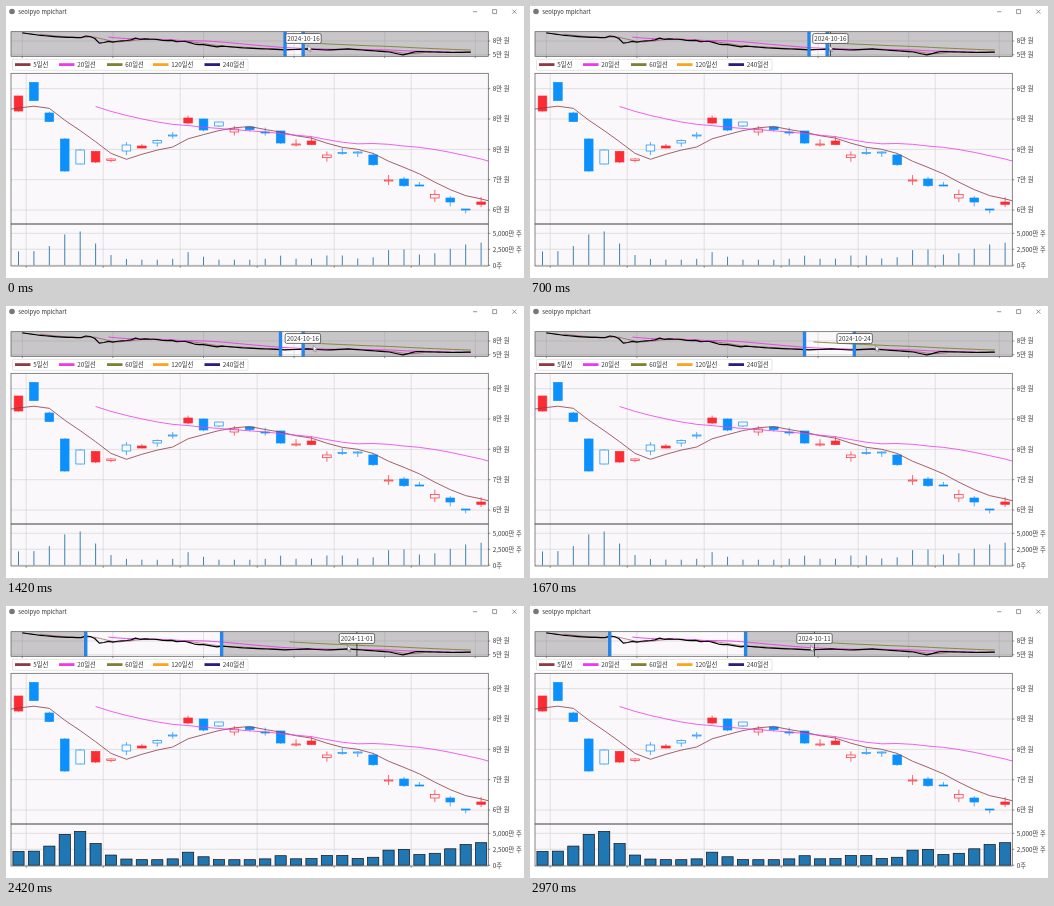
An HTML page for the animation above (3 s loop, 518x272 px).

```html
<!DOCTYPE html>
<html lang="ko">
<head>
<meta charset="utf-8">
<title>mplchart</title>
<style>
html, body { margin: 0; width: 100%; height: 100%; overflow: hidden; background: #fff; }
svg { display: block; width: 518px; height: 272px; }
text { font-family: "Noto Sans CJK KR", "Noto Sans CJK", "Noto Sans", sans-serif; font-size: 6.3px; fill: #333; }
</style>
</head>
<body>
<svg id="stage" viewBox="0 0 518 272" xmlns="http://www.w3.org/2000/svg">
  <clipPath id="pricePanel"><rect x="5" y="67.3" width="477.3" height="150.7"/></clipPath>
</svg>
<script>
const stage = document.getElementById('stage');
const LOOP = 3000, STEP = 30;
const LEFT = 5, RIGHT = 482.3, NAV_TOP = 25.7, NAV_BOTTOM = 50.3;
const PANEL = '#faf8fb', GRID = '#cfcfcf', BLUE = '#0c90fc', RED = '#fb2c33';
const BROWN = '#8f3a43', PINK = '#ea3cea', OLIVE = '#7f8034';

function set(el, attrs) {
  for (const key in attrs) el.setAttribute(key, attrs[key]);
}
function add(tag, attrs, parent = stage) {
  const el = document.createElementNS('http://www.w3.org/2000/svg', tag);
  set(el, attrs);
  return parent.appendChild(el);
}
const rect = (x, y, width, height, attrs, parent) => add('rect', { x, y, width, height, ...attrs }, parent);
const line = (x1, y1, x2, y2, stroke, width = 0.6, parent) =>
  add('line', { x1, y1, x2, y2, stroke, 'stroke-width': width }, parent);
function label(x, y, content, attrs = {}, parent) {
  const el = add('text', { x, y, ...attrs }, parent);
  el.textContent = content;
  return el;
}
const panel = (top, bottom, attrs) => rect(LEFT, top, RIGHT - LEFT, bottom - top, attrs);
const frame = (top, bottom) => panel(top, bottom, { fill: 'none', stroke: '#555', 'stroke-width': 0.7 });

function timeAxis(first, pitch, top, bottom) {
  for (let i = 0; i < 6; i++) {
    const x = first + i * pitch;
    line(x, top, x, bottom, GRID);
    line(x, bottom, x, bottom + 1.8, '#444');
  }
}
function valueAxis(first, pitch, names) {
  names.forEach((name, i) => {
    const y = first + i * pitch;
    line(LEFT, y, RIGHT, y, GRID);
    line(RIGHT, y, RIGHT + 2, y, '#444');
    label(486.8, y + 2.3, name);
  });
}

function between(points, at) {
  const i = Math.max(1, points.findIndex(([p]) => p >= at));
  const [p0, v0] = points[i - 1], [p1, v1] = points[i];
  return v0 + (v1 - v0) * (at - p0) / (p1 - p0);
}

let seed = 11;
const random = () => (seed = seed * 16807 % 2147483647) / 2147483647;

// Daily closes as heights in the price panel: a falling start, the visible days, then a slow slide
const FIRST = 14;
const visible = [90, 94.5, 115.5, 165, 158, 145.5, 153, 145, 140, 137, 130, 112, 124, 120, 123, 123.6,
  127, 137, 138, 135, 149, 147.5, 147, 158.7, 174, 179.7, 180, 188.5, 196, 204, 196];
const bodies = [15, -18, -8.5, -32, -14, 10.5, 1.4, -6, 2, -2.5, -1, 5, -11, -4, 3, -2.6,
  -1, -12, 1, 3.5, 2.7, -1, -1, -9.7, 1, -6.7, -1, 3.5, -4, -1, 2.3];
const later = [[44, 196], [49, 216], [58, 235], [63, 226], [67, 237], [72, 226],
  [81, 258], [84, 289], [87, 253], [95, 263], [100, 258]];
const closes = Array.from({ length: 100 }, (_, day) =>
  day < FIRST ? 106 - 50 * (1 - day / 13) ** 2 : visible[day - FIRST] ?? between(later, day));

const average = span => closes.map((_, day) => day + 1 < span ? null :
  closes.slice(day + 1 - span, day + 1).reduce((sum, y) => sum + y) / span);

const mainX = day => 12.5 + (day - FIRST) * 15.42;
const navX = day => 16.3 + day * 4.53;
const navY = y => 21.5 + y * 0.095;

function curve(values, x, y, stroke, width, attrs = {}) {
  const points = values.flatMap((v, day) => v === null ? [] : [`${x(day)},${y(v)}`]).join(' ');
  add('polyline', { points, fill: 'none', stroke, 'stroke-width': width, 'stroke-linejoin': 'round', ...attrs });
}

// Title bar
add('circle', { cx: 6, cy: 5.5, r: 2.8, fill: '#777' });
label(12.3, 7.8, 'seolpyo mplchart', { style: 'font-size:5.9px' });
add('path', { d: 'M467 5.7h4.3M486.6 3.6h4v4h-4zM506.3 3.6l4.2 4.2m0-4.2l-4.2 4.2',
  fill: 'none', stroke: '#555', 'stroke-width': 0.6 });

// Navigator
panel(NAV_TOP, NAV_BOTTOM, { fill: PANEL });
timeAxis(navX(0), navX(20) - navX(0), NAV_TOP, NAV_BOTTOM);
valueAxis(35, 13.7, ['8만 원', '5만 원']);
const [shadeLeft, shadeRight] = [0, 1].map(() =>
  panel(NAV_TOP, NAV_BOTTOM, { fill: '#808080', 'fill-opacity': 0.42 }));
curve(average(5), navX, navY, BROWN, 0.6);
curve(average(20), navX, navY, PINK, 0.9);
curve(average(60), navX, navY, OLIVE, 0.9);
curve(closes, navX, navY, '#000', 1.2);
const cross = line(0, NAV_TOP, 0, NAV_BOTTOM, '#111', 0.7);
const handles = [0, 1].map(() => rect(0, NAV_TOP, 3.4, NAV_BOTTOM - NAV_TOP, { fill: '#2585ea' }));
frame(NAV_TOP, NAV_BOTTOM);

// Legend
rect(6.5, 53.3, 235.5, 11, { rx: 1, fill: '#fff', stroke: '#d4d4d4', 'stroke-width': 0.6 });
[[9, '5일선', BROWN], [53, '20일선', PINK], [101, '60일선', OLIVE],
 [147, '120일선', '#fba322'], [198.5, '240일선', '#2d1b80']].forEach(([x, name, color]) => {
  line(x, 58.6, x + 15.5, 58.6, color, 2.8);
  label(x + 18.3, 60.8, name);
});

// Price and volume panels
panel(67.3, 260, { fill: PANEL });
timeAxis(20.2, 77, 67.3, 260);
valueAxis(82.7, 30.33, ['8만 원', '8만 원', '8만 원', '7만 원', '6만 원']);
valueAxis(227.3, 15.95, ['5,000만 주', '2,500만 주', '0주']);

// Red when the day rose; filled when the close also moved that way from the day before
visible.forEach((close, i) => {
  const body = bodies[i], x = mainX(FIRST + i);
  const rose = body > 0;
  const filled = rose === (i === 0 || close < visible[i - 1]);
  const color = rose ? RED : BLUE;
  const top = Math.min(close, close + body), height = Math.abs(body);
  const reach = height > 8 ? 1.5 : 5;
  line(x, top - reach * random(), x, top + height + reach * random(), color, 0.7);
  rect(x - 4.3, top, 8.6, height, { fill: filled ? color : PANEL, stroke: color, 'stroke-width': 0.7 });
});
const clipped = { 'clip-path': 'url(#pricePanel)' };
curve(average(5), mainX, y => y, BROWN, 0.8, clipped);
curve(average(20), mainX, y => y, PINK, 0.8, clipped);

// Volume: a quiet base with bursts of [day, height, spread]
const bursts = [[0, 8, 2], [3.7, 29, 1.7], [11.2, 8, 0.8], [17, 4, 0.8], [20.5, 5, 1.2], [24.5, 11, 1.2], [30, 17, 3]];
const volume = i => bursts.reduce((sum, [at, height, spread]) =>
  sum + height * Math.exp(-(((i - at) / spread) ** 2)), 5.5);
const wideBars = add('g', { fill: '#1f77b4', stroke: '#111', 'stroke-width': 0.7 });
const thinBars = add('g', {});
visible.forEach((_, i) => {
  const x = mainX(FIRST + i), height = volume(i);
  rect(x - 5.6, 259.2 - height, 11.2, height, {}, wideBars);
  line(x, 259.2 - height, x, 259.2, '#3b83b4', 1, thinBars);
});
frame(67.3, 218);
frame(218, 260);

// Date box and pointer
const tip = add('g', {});
rect(-17.7, 27.6, 35.4, 9.8, { rx: 1.6, fill: '#fff', stroke: '#333', 'stroke-width': 0.7 }, tip);
const date = label(0, 34.6, '', { 'text-anchor': 'middle' }, tip);
const pointer = add('path', { d: 'M0 0v5.6l1.3-1.2 1 2.1.9-.4-1-2.1h1.8z',
  fill: '#fff', stroke: '#444', 'stroke-width': 0.4 });

const mousePath = [[0, 297.5], [90, 302], [260, 306], [700, 300.3], [830, 298.5], [1120, 280.5], [1230, 276],
  [1670, 327], [1760, 351], [2240, 352], [2380, 353], [2700, 319.5], [2970, 284.5], [3100, 279]];
const mouseAt = t => between(mousePath, t);
const OCT_10 = 58;
const drags = [{ from: 0, to: 840, day: OCT_10 }, { from: 1230, to: 2400, day: OCT_10 - 1 }];

// Steps over trading days from Thursday, 10 October 2024
function tradingDate(day) {
  const result = new Date(Date.UTC(2024, 9, 10));
  const move = Math.sign(day - OCT_10);
  while (day !== OCT_10) {
    result.setUTCDate(result.getUTCDate() + move);
    if (result.getUTCDay() % 6) day -= move;
  }
  return result.toISOString().slice(0, 10);
}

function draw(t) {
  const x = mouseAt(t);
  const day = Math.floor((x - navX(0)) / 4.53 + 0.22);
  const drag = drags.find(d => t >= d.from && t < d.to);
  const days = drag ? [drag.day, Math.max(drag.day, day)] : [FIRST, FIRST + 30];
  const [a, b] = days.map(navX);

  set(shadeLeft, { width: a - LEFT });
  set(shadeRight, { x: b, width: RIGHT - b });
  handles.forEach((handle, i) => set(handle, { x: [a, b][i] - 1.7 }));
  set(wideBars, { visibility: drag ? 'hidden' : 'visible' });
  set(thinBars, { visibility: drag ? 'visible' : 'hidden' });
  set(cross, { x1: x, x2: x });
  set(tip, { transform: `translate(${x} 0)` });
  date.textContent = tradingDate(day);
  set(pointer, { transform: `translate(${mouseAt(t + 90)} 39.5)` });
}

const begin = performance.now();
function tick() {
  const t = (performance.now() - begin) % LOOP;
  draw(Math.floor(t / STEP) * STEP);
  requestAnimationFrame(tick);
}
tick();
</script>
</body>
</html>
```
